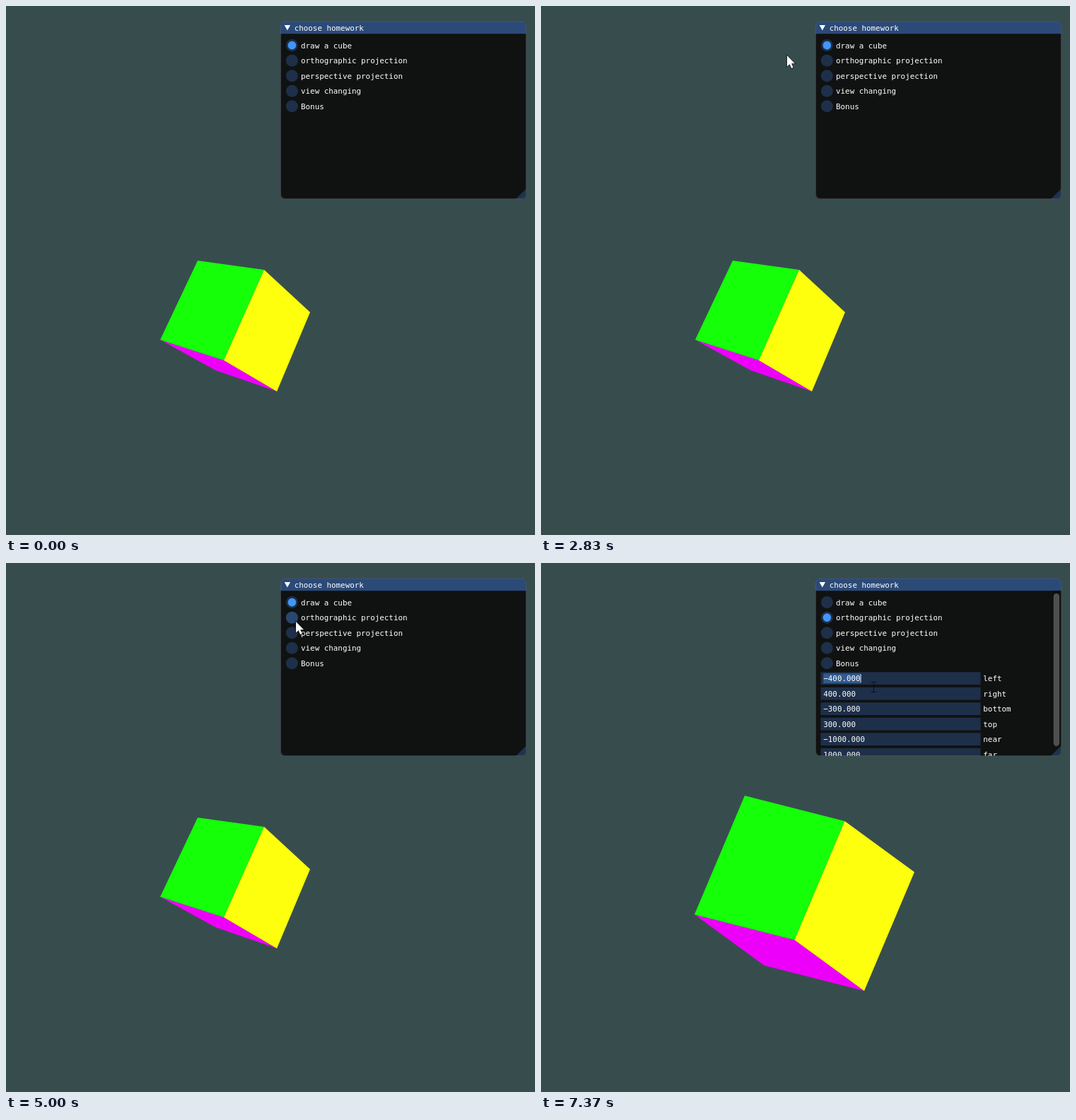
Animation of 748 by 748 pixels, one loop 8000 ms. Source, as an HTML page with a canvas:

```html
<!DOCTYPE html>
<html lang="en">
<head>
<meta charset="utf-8">
<title>choose homework</title>
<style>
  html, body { margin: 0; width: 100%; height: 100%; overflow: hidden; background: #374d4d; }
  canvas { display: block; width: 748px; height: 748px; }
</style>
</head>
<body>
<canvas id="stage" width="748" height="748"></canvas>
<script>
const ctx = document.getElementById('stage').getContext('2d');
const LOOP = 8000, SIZE = 748;
const SWITCH = 5165, SELECT = 5195, EDIT = 7050;
const GLIDE = 360;

// The panel is laid out in an 800 unit window
const SCALE = SIZE / 800;
const PANEL = { x: 415, y: 23, w: 372, h: 269 };
const ITEM = 19, GAP = 4, PAD = 8, CHAR = 7;
const LEFT = PANEL.x + PAD;
const FIELD_W = PANEL.w * 0.65;
const rowMid = i => PANEL.y + ITEM + PAD + ITEM / 2 + i * (ITEM + GAP);

const FRAME = '#1e2f49', HOVER = '#28486f', CHECK = '#4296fa';
const options = ['draw a cube', 'orthographic projection', 'perspective projection', 'view changing', 'Bonus'];
const fields = { left: -400, right: 400, bottom: -300, top: 300, near: -1000, far: 1000 };

// Each cube: its front corner and that corner's neighbours, as x, y, depth
const perspective = { front: [308, 501], up: [365, 373, 1.036], left: [218, 472, 1.139], right: [383, 545, 1.163] };
const orthographic = { front: [358.5, 533], up: [429.5, 365, 1], left: [217, 497, 1], right: [457, 605, 1] };
const faces = [['#ed00f9', 'left', 'right'], ['#15ff09', 'up', 'left'], ['#fdff0c', 'up', 'right']];

// Pointer stops: arrival time, x, y
const stops = [
  [2560, 186, 45], [2780, 348, 70], [3650, 411, 75], [4700, 410, 83], [5800, 422, 114],
  [6100, 411, 84], [6300, 482, 198], [6900, 462, 162], [7340, 471, 176]
];

function pointer(t) {
  if (t < stops[0][0]) return null;
  const i = stops.findIndex(s => s[0] > t);
  if (i < 0) return stops[stops.length - 1].slice(1);
  const [t0, x0, y0] = stops[i - 1], [t1, x1, y1] = stops[i];
  const u = Math.max(0, 1 - (t1 - t) / Math.min(GLIDE, t1 - t0));
  const e = u * u * (3 - 2 * u);
  return [x0 + (x1 - x0) * e, y0 + (y1 - y0) * e];
}

function poly(points, fill) {
  ctx.beginPath();
  points.forEach(([x, y]) => ctx.lineTo(x, y));
  ctx.closePath();
  ctx.fillStyle = fill;
  ctx.fill();
}

function box(x, y, w, h, fill) {
  ctx.fillStyle = fill;
  ctx.fillRect(x, y, w, h);
}

function roundBox(x, y, w, h, r) {
  ctx.beginPath();
  ctx.roundRect(x, y, w, h, r);
}

function disc(x, y, r, fill) {
  ctx.beginPath();
  ctx.arc(x, y, r, 0, Math.PI * 2);
  ctx.fillStyle = fill;
  ctx.fill();
}

function label(text, x, mid) {
  ctx.fillStyle = '#fff';
  ctx.fillText(text, x, mid + 4.4);
}

// Corner opposite the front one on the face spanned by a and b
function farCorner(f, a, b) {
  const w = a[2] + b[2] - 1;
  return f.map((v, i) => (a[i] * a[2] + b[i] * b[2] - v) / w);
}

function drawCube(cube) {
  for (const [color, p, q] of faces) {
    const a = cube[p], b = cube[q];
    poly([cube.front, a, farCorner(cube.front, a, b), b], color);
  }
}

function drawOptions(selected, mouse) {
  const cx = LEFT + ITEM / 2, tx = LEFT + ITEM + GAP;
  options.forEach((text, i) => {
    const y = rowMid(i);
    const over = mouse && Math.abs(mouse[1] / SCALE - y) < ITEM / 2
      && mouse[0] / SCALE > LEFT && mouse[0] / SCALE < tx + text.length * CHAR;
    disc(cx, y, 9.1, over ? HOVER : FRAME);
    if (i === selected) disc(cx, y, 6.2, CHECK);
    label(text, tx, y);
  });
}

function drawFields(editing) {
  Object.entries(fields).forEach(([name, value], i) => {
    const y = rowMid(options.length + i);
    const text = value.toFixed(3).replace('-', '\u2212');
    box(LEFT, y - ITEM / 2, FIELD_W, ITEM, FRAME);
    if (editing && i === 0) {
      const w = text.length * CHAR;
      box(LEFT + GAP, y - 7.5, w, 15, '#315a8e');
      box(LEFT + GAP + w, y - 6.5, 1, 13, '#fff');
    }
    label(text, LEFT + GAP, y);
    label(name, LEFT + FIELD_W + GAP, y);
  });
}

function drawScrollbar(right, top, bottom) {
  box(right - 14, top, 14, bottom - top, '#0c0e0d');
  roundBox(right - 12, top + 4, 9, bottom - top - 4, 4.5);
  ctx.fillStyle = '#4f4f4f';
  ctx.fill();
}

function drawPanel(t, mouse) {
  const { x, y, w, h } = PANEL, right = x + w, bottom = y + h;
  const selected = t >= SELECT ? 1 : 0;
  ctx.save();
  ctx.scale(SCALE, SCALE);
  ctx.font = '11.63px "DejaVu Sans Mono", monospace';
  ctx.save();
  roundBox(x, y, w, h, 7);
  ctx.clip();
  box(x, y, w, h, '#101211');
  box(x, y, w, ITEM, '#2b4a78');
  poly([[x + 6, y + 6], [x + 15, y + 6], [x + 10.5, y + 14]], '#fff');
  label('choose homework', x + 21, y + ITEM / 2);
  drawOptions(selected, mouse);
  if (t >= SWITCH) drawFields(t >= EDIT);
  if (selected) drawScrollbar(right, y + ITEM, bottom - 15);
  poly([[right, bottom - 16], [right, bottom], [right - 16, bottom]], '#1e334d');
  ctx.restore();
  roundBox(x + 0.5, y + 0.5, w - 1, h - 1, 7);
  ctx.strokeStyle = 'rgba(110,110,128,.5)';
  ctx.lineWidth = 1;
  ctx.stroke();
  ctx.restore();
}

function drawArrow() {
  const shape = [[0, 0], [0, 15.5], [3.6, 12.2], [6.1, 18], [8.6, 17], [6.1, 11.2], [11, 11.2]];
  poly(shape, '#fff');
  ctx.strokeStyle = '#111';
  ctx.lineWidth = 1.4;
  ctx.stroke();
  poly(shape, '#fff');
}

function drawBeam() {
  const ink = '#070b10';
  box(-1, -7, 1, 13, ink);
  for (const y of [-8, 6]) {
    box(-4, y, 3, 1, ink);
    box(0, y, 3, 1, ink);
  }
}

function draw(t) {
  const mouse = pointer(t);
  box(0, 0, SIZE, SIZE, '#374d4d');
  drawCube(t >= SWITCH ? orthographic : perspective);
  drawPanel(t, mouse);
  if (!mouse) return;
  ctx.save();
  ctx.translate(...mouse);
  if (t >= SWITCH && mouse[1] / SCALE > rowMid(options.length) - ITEM / 2) drawBeam();
  else drawArrow();
  ctx.restore();
}

const start = performance.now();
function tick() {
  draw((performance.now() - start) % LOOP);
  requestAnimationFrame(tick);
}
tick();
</script>
</body>
</html>
```
